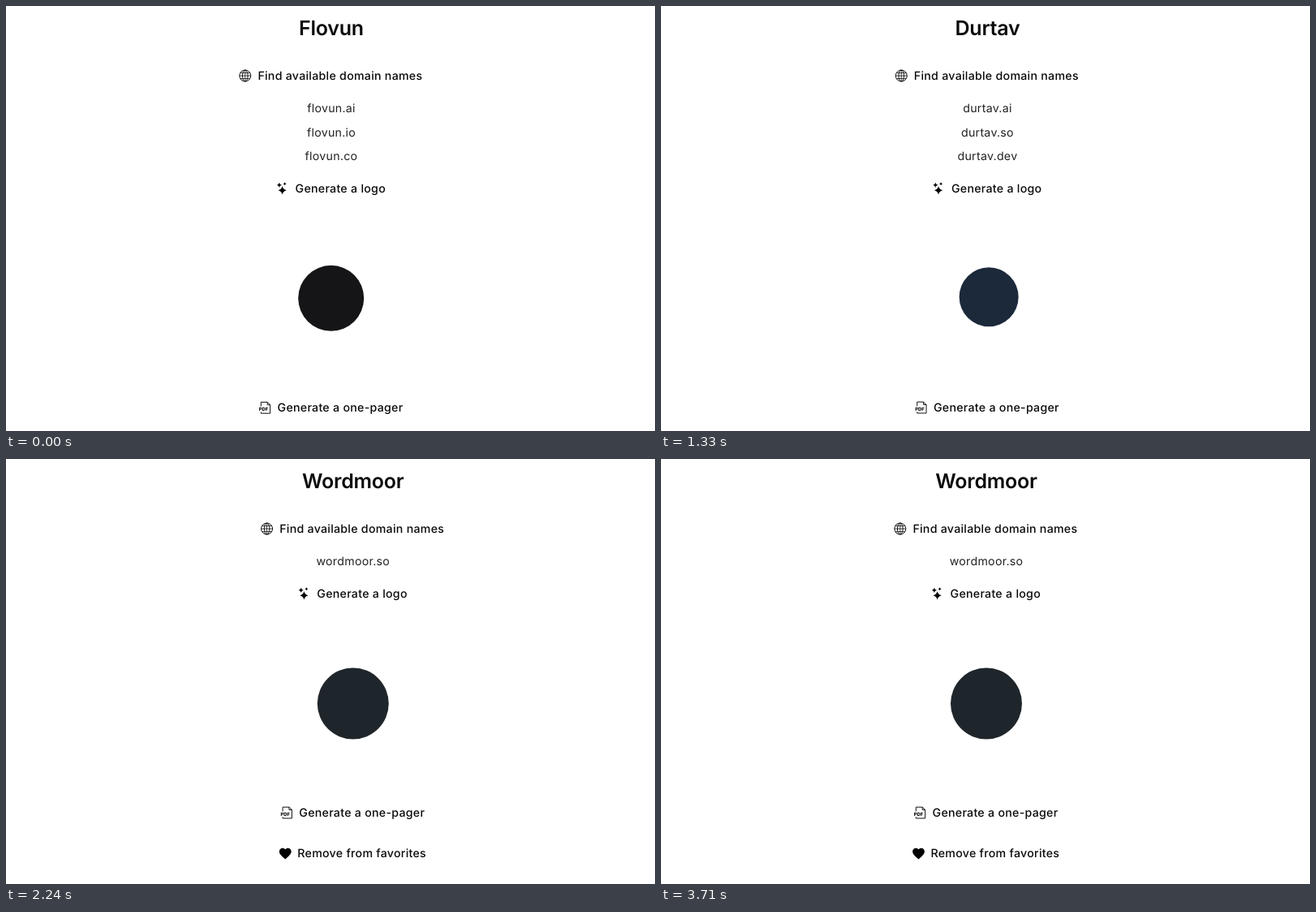
These frames come from a looping animation (800x524 px, 3780 ms). An HTML page:

```html
<!DOCTYPE html>
<html lang="en">
<head>
<meta charset="utf-8">
<title>Name carousel</title>
<style>
  html, body { margin: 0; width: 100%; height: 100%; overflow: hidden; background: #fff; }
  svg { display: block; width: 800px; height: 524px; }
  text {
    font: 500 14.2px Inter, sans-serif; font-optical-sizing: none;
    letter-spacing: .27px; text-rendering: geometricPrecision; fill: #0a0a0a;
  }
  .title { font-weight: 600; font-size: 25px; letter-spacing: -.25px; text-anchor: middle; }
  .domain { font-weight: 400; fill: #222; text-anchor: middle; }
  .badge { font-weight: 800; font-size: 5.8px; letter-spacing: 0; }
  .line { fill: none; stroke: #111; stroke-width: 1; }
  .card { fill: #fff; stroke: #e5e5e7; stroke-width: 1.2; }
</style>
</head>
<body>
<svg viewBox="0 0 800 524">
  <defs>
    <rect id="card" class="card" x="-121" y="-40" width="1044" height="620"/>
    <path id="star" d="M0-1Q.2-.2 1 0Q.2.2 0 1Q-.2.2-1 0Q-.2-.2 0-1Z"/>

    <!-- rows are drawn around y = 0 -->
    <g id="find">
      <g class="line" transform="translate(294.8 0)">
        <circle r="7"/>
        <ellipse rx="3.3" ry="7"/>
        <path d="M0-7V7M-7 0H7M-6-3.5H6M-6 3.5H6" stroke-width=".8"/>
      </g>
      <text x="310.4" y="5">Find available domain names</text>
    </g>
    <g id="logo">
      <use href="#star" transform="translate(340.6 2.3) scale(5.2)"/>
      <use href="#star" transform="translate(336.9 -4.2) scale(3)"/>
      <use href="#star" transform="translate(343.6 -5.8) scale(2)"/>
      <text x="356.5" y="5">Generate a logo</text>
    </g>
    <g id="pdf">
      <path class="line" d="M314.3-1.5V-6.8H322.2L325.6-3.4V7H314.3V5.3M322.2-6.8V-3.4H325.6"/>
      <text class="badge" x="311.8" y="4">PDF</text>
      <text x="334.5" y="5">Generate a one-pager</text>
    </g>
    <g id="remove">
      <path transform="translate(308.6 -8.7) scale(.74)" d="M12 21.35l-1.45-1.32C5.4 15.36 2 12.28 2 8.5 2 5.42 4.42 3 7.5 3c1.74 0 3.41.81 4.5 2.09C13.09 3.81 14.76 3 16.5 3 19.58 3 22 5.42 22 8.5c0 3.78-3.4 6.86-8.55 11.54z"/>
      <text x="332.5" y="5">Remove from favorites</text>
    </g>
  </defs>

  <g id="track">
    <g>
      <use href="#card"/>
      <text class="title" x="401" y="35.5">Flovun</text>
      <use href="#find" y="86"/>
      <text class="domain" x="401" y="131">flovun.ai</text>
      <text class="domain" x="401" y="160.5">flovun.io</text>
      <text class="domain" x="401" y="190">flovun.co</text>
      <use href="#logo" y="225"/>
      <circle cx="400.7" cy="360.3" r="40.5" fill="#151517"/>
      <use href="#pdf" y="495.2"/>
    </g>
    <g transform="translate(1062 0)">
      <use href="#card"/>
      <text class="title" x="401" y="35.5">Durtav</text>
      <use href="#find" y="86"/>
      <text class="domain" x="401" y="131">durtav.ai</text>
      <text class="domain" x="401" y="160.5">durtav.so</text>
      <text class="domain" x="401" y="190">durtav.dev</text>
      <use href="#logo" y="225"/>
      <circle cx="402.7" cy="358.8" r="36.5" fill="#1b293b"/>
      <use href="#pdf" y="495"/>
    </g>
    <g transform="translate(2124 0)">
      <use href="#card"/>
      <text class="title" x="401" y="35.5">Wordmoor</text>
      <use href="#find" y="86"/>
      <text class="domain" x="401" y="131">wordmoor.so</text>
      <use href="#logo" y="166"/>
      <circle cx="401" cy="301.5" r="44" fill="#1f262b"/>
      <use href="#pdf" y="436"/>
      <use href="#remove" y="486.3"/>
    </g>
  </g>
</svg>
<script>
  const LOOP = 3780, STEP = 70, PITCH = 1062;
  const STARTS = [321, 1664.3];
  const RAMP = 31, TAU = 148;
  const track = document.getElementById('track');

  // Share of a slide change done s ms after it begins: short ramp, then exponential settling.
  function progress(s) {
    if (s <= 0) return 0;
    return 1 - Math.exp(-(s - RAMP * (1 - Math.exp(-s / RAMP))) / TAU);
  }

  function draw(now) {
    const t = Math.floor((now % LOOP) / STEP) * STEP;
    const x = STARTS.reduce((sum, start) => sum + PITCH * progress(t - start), 0);
    track.setAttribute('transform', `translate(${(-x).toFixed(2)} 0)`);
    requestAnimationFrame(() => draw(performance.now()));
  }
  draw(performance.now());
</script>
</body>
</html>
```
